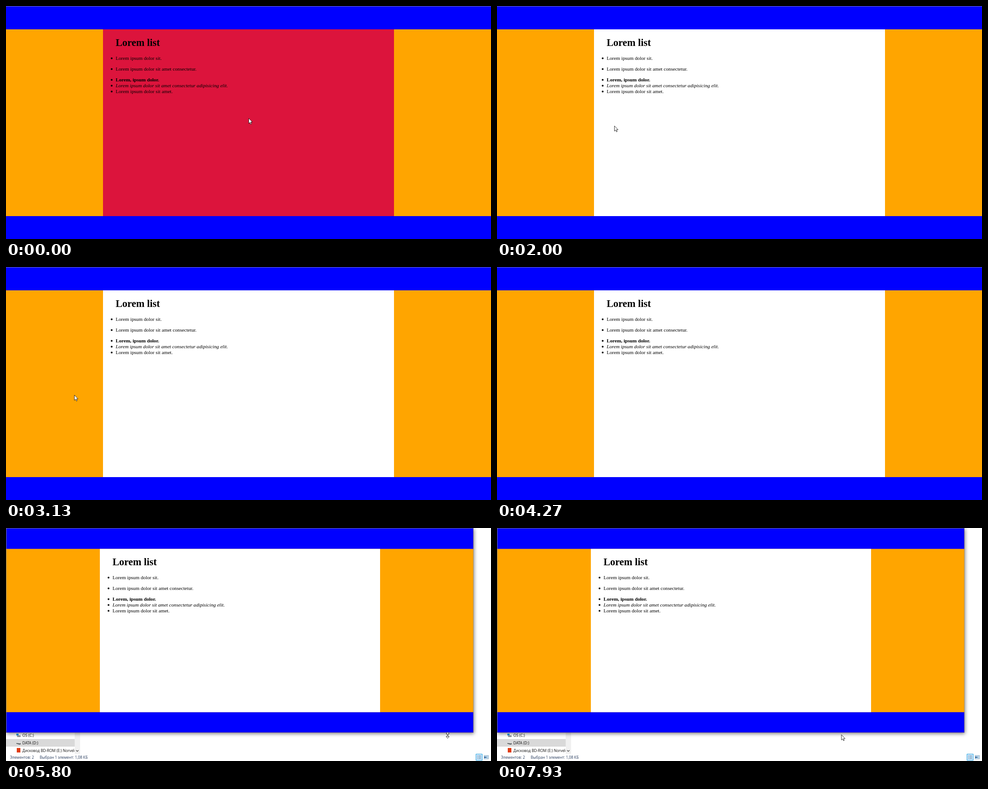
Animation, 1080 px wide and 519 px high, one loop 8000 ms. Source, as an HTML page:

```html
<!DOCTYPE html>
<html lang="en">
<head>
<meta charset="utf-8">
<title>Lorem list</title>
<style>
  html, body { margin: 0; width: 100%; height: 100%; overflow: hidden; background: #fff; }
  svg { display: block; }
  .bar { fill: #00f; }
  .side { fill: #ffa500; }
  .list { font: 11.2px "Liberation Serif", serif; }
  .list .title { font-size: 22.4px; }
  .bold { font-weight: bold; }
  .italic { font-style: italic; }
  .files { font: 8.3px "Open Sans", sans-serif; fill: #111; }
  .files .status { fill: #263a5c; }
  .shadow { filter: drop-shadow(1px 2px 4px #0008); }
</style>
</head>
<body>
<svg width="1080" height="519" viewBox="0 0 1080 519">
  <defs>
    <clipPath id="sidebar"><path d="M0 450H153V504H0Z"/></clipPath>
  </defs>

  <g id="maximized">
    <path class="side" d="M0 0H1080V519H0Z"/>
    <path class="bar" d="M0 0H1080V52H0ZM0 468H1080V519H0Z"/>
    <path fill="#7c7caa" d="M0 0H1080V1H0Z"/>
    <path id="content" d="M216 52H864V468H216Z"/>
  </g>

  <g id="restored">
    <g class="files">
      <path fill="#d9d9d9" d="M0 470H153V487H0Z"/>
      <path fill="#f0f0f0" d="M153 450H165V503H153Z"/>
      <path d="M156 495l2.7 2.7 2.7-2.7" fill="none" stroke="#444" stroke-width="1.2"/>
      <path fill="#2a9be0" d="M23 458h5v4h-5z"/>
      <path fill="#8b9298" d="M24 462.5l7-.8 2 1.8-1 2h-7z"/>
      <path fill="#555b5e" d="M23 479l8 1 2-.5v2l-3 1-7-2z"/>
      <path fill="#e03c14" d="M24 490h8v10h-8z"/>
      <g clip-path="url(#sidebar)">
        <text x="36.5" y="464.5">OS (C:)</text>
        <text x="36.5" y="481.5">DATA (D:)</text>
        <text x="36.5" y="498.5">Дисковод BD-ROM (E:) Norvelc</text>
      </g>
      <text class="status" x="9" y="514">Элементов: 2</text>
      <text class="status" x="75" y="514">Выбран 1 элемент: 1,08 КБ</text>
      <path fill="#cce8ff" stroke="#26a0da" d="M1046.5 503.5h14v14h-14z"/>
      <path d="M1049 507.5h2m1 0h6m-9 3h2m1 0h6m-9 3h2m1 0h6" stroke="#597d96"/>
      <path fill="#b9d7ec" stroke="#8fa4b5" stroke-width=".7" d="M1064.5 506.5h10v8h-10z"/>
      <path fill="#285b91" d="M1065 509l7 1.500-7 2z"/>
    </g>
    <path class="shadow" fill="#777" d="M0 0H1041V456H0Z"/>
    <path class="side" d="M1 1H1040.500V455.500H1Z"/>
    <path class="bar" d="M1 1H1040.500V46.500H1ZM1 410.300H1040.500V455.500H1Z"/>
    <path fill="#fff" d="M209 46.500H833V410.300H209Z"/>
  </g>

  <g id="list" class="list">
    <text class="title bold" x="244.200" y="88.500">Lorem list</text>
    <text x="244.200" y="119.600">Lorem ipsum dolor sit.</text>
    <text x="244.200" y="143.700">Lorem ipsum dolor sit amet consectetur.</text>
    <text class="bold" x="244.200" y="167.800">Lorem, ipsum dolor.</text>
    <text class="italic" x="244.200" y="180.800">Lorem ipsum dolor sit amet consectetur adipisicing elit.</text>
    <text x="244.200" y="193.800">Lorem ipsum dolor sit amet.</text>
    <path d="M235.300 116.500h0m0 24h0m0 24h0m0 13h0m0 13h0" stroke="#000" stroke-width="4" stroke-linecap="round"/>
  </g>

  <g id="cursor">
    <path id="arrow" d="M0 0V11.800L2.700 9.300 4.500 13.400 6.300 12.600 4.500 8.600H8.200Z" fill="#fff" stroke="#000" stroke-width=".8"/>
    <path id="beam" d="M-2-5H-.5L0-4.500.5-5H2M0-4.500V4.500M-2 5H-.5L0 4.500.5 5H2" fill="none" stroke="#56a39c" stroke-width="1.100"/>
    <path id="resize" d="M0-7L3.500-3H1V3H3.500L0 7-3.500 3H-1V-3H-3.500Z" fill="#fff" stroke="#000" stroke-width=".8"/>
  </g>
</svg>

<script>
const LOOP = 8000;
const FRAME = 1000 / 15;
const RESTORE_AT = 5060;
const HOVER_LEAD = 70;

// time, x, y of the pointer
const path = [
  [0, 540.5, 250], [130, 540.5, 250], [800, 276.500, 98.500],
  [1000, 285, 185], [1500, 390, 245], [1800, 375, 252],
  [2000, 261.500, 267], [2200, 130, 283], [2670, 106, 288],
  [3130, 152, 285.500], [3350, 170, 270], [3750, 600, 130],
  [4180, 1000, -20], [5070, 1000, -20], [5600, 983.500, 440],
  [5800, 983.500, 461.500], [6530, 983.500, 461.500], [6600, 980, 462],
  [6870, 970, 461], [7270, 890, 460.500], [7530, 890, 460.500],
  [7930, 767, 460.500], [8000, 767, 460.500]
];

const $ = id => document.getElementById(id);
const show = (id, visible) => $(id).setAttribute("display", visible ? "inline" : "none");
const inside = ([x, y], left, top, right, bottom) =>
  x >= left && x <= right && y >= top && y <= bottom;

function pointerAt(time) {
  const t = Math.min(time, LOOP);
  const i = Math.max(1, path.findIndex(key => key[0] >= t));
  const [t0, x0, y0] = path[i - 1], [t1, x1, y1] = path[i];
  const k = (t - t0) / (t1 - t0);
  return [x0 + (x1 - x0) * k, y0 + (y1 - y0) * k];
}

function draw(t) {
  const restored = t >= RESTORE_AT;
  const pointer = pointerAt(t);
  const hovered = inside(pointerAt(t + HOVER_LEAD), 216, 52, 864, 468);
  const kind = t >= 5700 && t < 6860 ? "resize"
    : !restored && inside(pointer, 244, 68, 496, 198) ? "beam" : "arrow";

  show("maximized", !restored);
  show("restored", restored);
  $("content").setAttribute("fill", hovered ? "#dc143c" : "#fff");
  $("list").setAttribute("transform", restored ? "translate(-7 -6)" : "");
  $("cursor").setAttribute("transform", `translate(${pointer})`);
  for (const id of ["arrow", "beam", "resize"]) show(id, id === kind);
}

function tick() {
  const t = performance.now() % LOOP;
  draw(Math.floor(t / FRAME + 0.1) * FRAME);
  requestAnimationFrame(tick);
}
tick();
</script>
</body>
</html>
```
